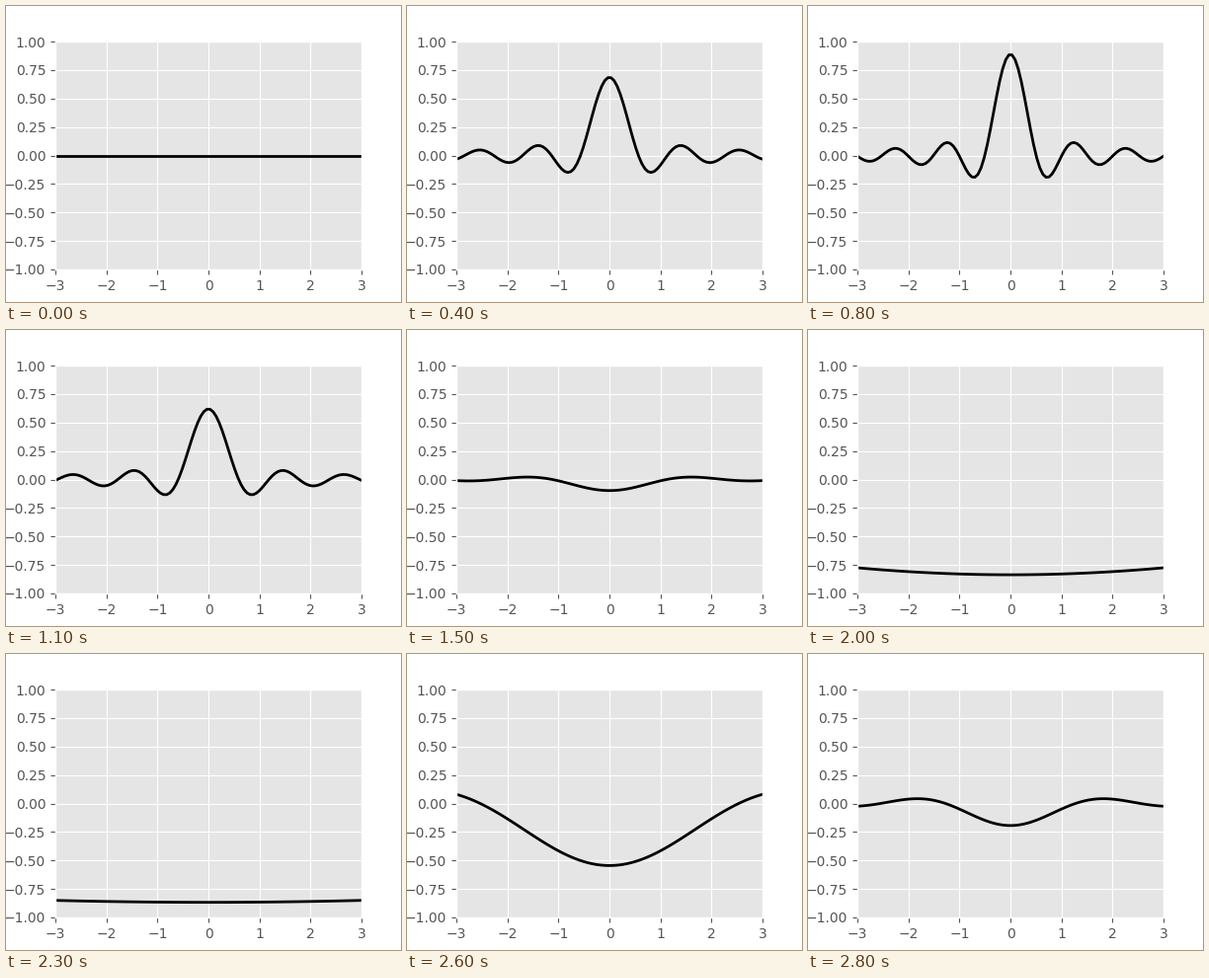
Write a matplotlib script that moves like this. It is 400 px wide and 300 px high and loops after 2.9 s.

```python
import numpy as np
import matplotlib.pyplot as plt
from matplotlib.animation import FuncAnimation

FRAMES = 29
INTERVAL = 100

plt.style.use("ggplot")
fig, ax = plt.subplots(figsize=(4, 3), dpi=100, facecolor="white")
ax.set_xlim(-3, 3)
ax.set_ylim(-1, 1)

x = np.linspace(-3, 3, 100)
line, = ax.plot(x, np.zeros_like(x), color="black", lw=2)


def update(i):
    """Swing the height and the frequency of a sinc pulse together."""
    swing = np.sin(2 * np.pi * i / FRAMES)
    line.set_ydata(0.9 * swing * np.sinc((1 + swing) * x))
    return line,


anim = FuncAnimation(fig, update, frames=FRAMES, interval=INTERVAL,
                     repeat=True, repeat_delay=0)
plt.show()
```
